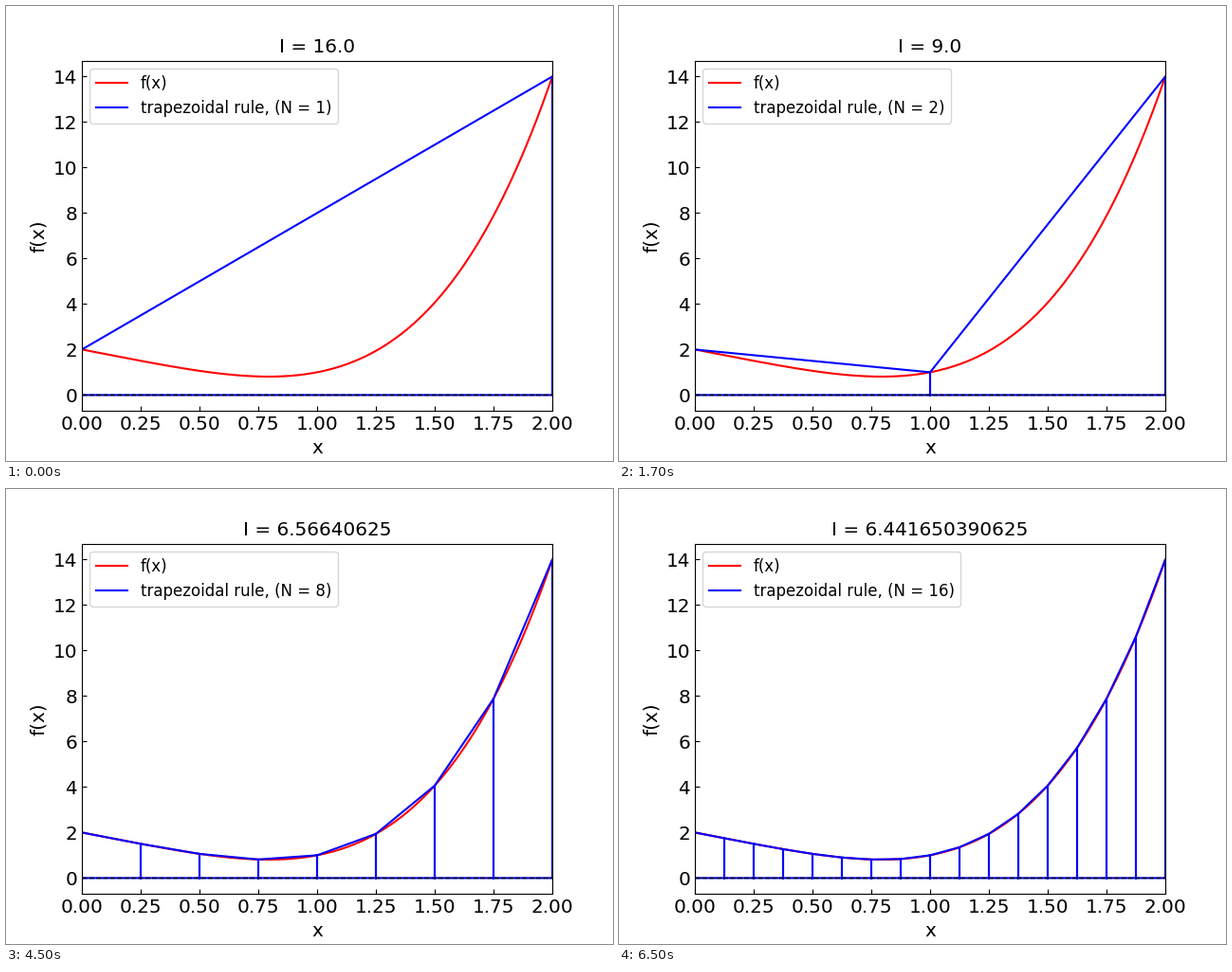
A matplotlib script for the animation above (8 s loop, 640x480 px).

```python
import numpy as np
import matplotlib.pyplot as plt
from matplotlib.animation import FuncAnimation

A, B = 0.0, 2.0
STEP_MS = 500
FRAMES = 16

plt.rcParams.update({
    "font.family": "DejaVu Sans",
    "axes.titlesize": 14.4,
    "axes.labelsize": 14.4,
    "xtick.labelsize": 14.4,
    "ytick.labelsize": 14.4,
    "legend.fontsize": 12,
    "xtick.direction": "in",
    "ytick.direction": "in",
})


def f(x):
    return x**4 - 2 * x + 2


def trapezoids(n):
    """Outline of all n trapezoids as one path, and their total area."""
    x = np.linspace(A, B, n + 1)
    y = f(x)
    xs, ys = [], []
    for x0, x1, y0, y1 in zip(x[:-1], x[1:], y[:-1], y[1:]):
        xs += [x0, x0, x1, x1, x0, np.nan]
        ys += [0, y0, y1, 0, 0, np.nan]
    area = (B - A) / n * (y.sum() - (y[0] + y[-1]) / 2)
    return xs, ys, area


fig, ax = plt.subplots(figsize=(6.4, 4.8), dpi=100)


def draw(frame):
    # The number of panels doubles every 2 s, first at 0.5 s.
    n = 2 ** ((frame + 3) // 4)
    xs, ys, area = trapezoids(n)
    x = np.linspace(A, B, 201)

    ax.clear()
    ax.plot(x, f(x), "r", label="f(x)")
    ax.plot(xs, ys, "b", label=f"trapezoidal rule, (N = {n})")
    ax.axhline(0, color="k", ls="--", lw=1)
    ax.set(xlim=(A, B), ylim=(-0.7, 14.7), xlabel="x", ylabel="f(x)",
           title=f"I = {area}")
    ax.legend(loc="upper left")


anim = FuncAnimation(fig, draw, frames=FRAMES, init_func=lambda: None,
                     interval=STEP_MS, repeat=True, repeat_delay=0)
plt.show()
```
